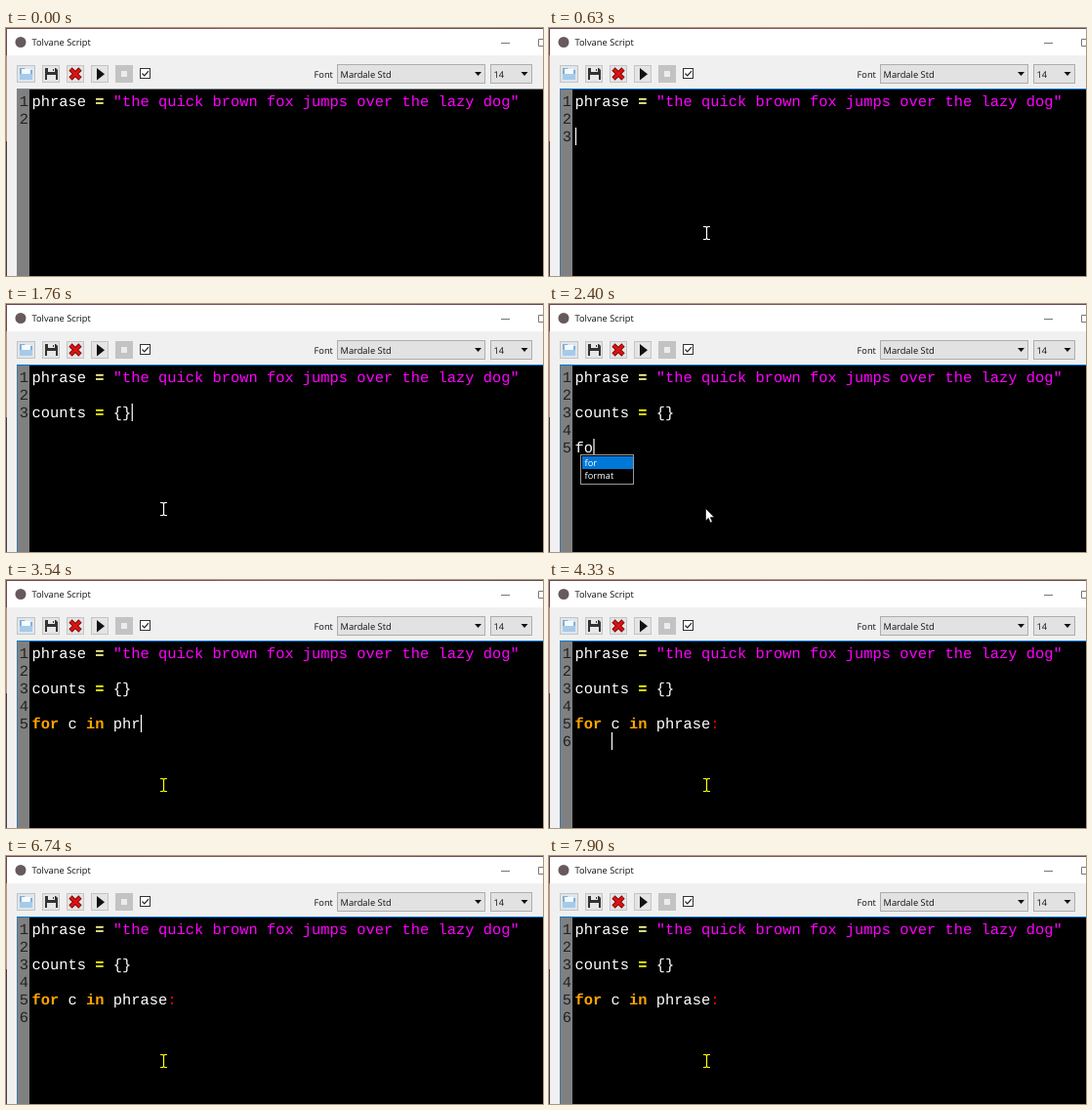
An HTML page that plays this animation: 550x254 px, repeating every 8 s.

```html
<!DOCTYPE html>
<html lang="en">
<head>
<meta charset="utf-8">
<title>Editor typing</title>
<style>
  html, body { margin: 0; width: 550px; height: 254px; overflow: hidden; background: #f0f0f0; }
  svg { display: block; }
  text { white-space: pre; text-rendering: geometricPrecision; }
  .ui { font: 9.3px "Open Sans", "Noto Sans", sans-serif; fill: #111; }
  .code { font: 15.42px "Liberation Mono", monospace; fill: #fff; }
  .num { fill: #222; }
  .key { fill: #ffa500; font-weight: bold; }
  .str { fill: #f0f; }
  .op { fill: #ff0; font-weight: bold; }
  .pale .op { fill: #ffff96; }
  .colon { fill: #f00; }
  .button { fill: #e4e4e4; stroke: #c4c4c4; }
</style>
</head>
<body>
<svg width="550" height="254" viewBox="0 0 550 254">
  <defs>
    <linearGradient id="desk">
      <stop offset="0" stop-color="#6d474c"/>
      <stop offset=".5" stop-color="#8d5a58"/>
      <stop offset="1" stop-color="#6a4850"/>
    </linearGradient>
  </defs>

  <!-- desktop edge and window -->
  <rect width="550" height="254" fill="url(#desk)"/>
  <rect y="28" width="1" height="88" fill="#c58f86"/>
  <rect y="116" width="1" height="138" fill="#4b3545"/>
  <rect x="1" y="1" width="549" height="253" fill="#f0f0f0"/>
  <rect x="1" y="1" width="549" height="27" fill="#fff"/>
  <circle cx="15" cy="14.5" r="5.5" fill="#665a5c"/>
  <text class="ui" x="26.5" y="18">Tolvane Script</text>
  <path d="M507 15.5h9M551 11.5h-5.5v7h6" fill="none" stroke="#777"/>

  <!-- toolbar -->
  <g class="button">
    <rect x="11.5" y="38.5" width="18" height="17"/>
    <rect x="37.5" y="38.5" width="17" height="17"/>
    <rect x="62.5" y="38.5" width="17" height="17"/>
    <rect x="87.5" y="38.5" width="17" height="17"/>
  </g>
  <rect x="13" y="40" width="15" height="14" fill="#d8e8f5"/>
  <path d="M14 41h5l1 2h7v10H14z" fill="#86aed3"/>
  <path d="M16 42h9v5h-9z" fill="#f5faff"/>
  <path d="M14 47h13v6H14z" fill="#a6cbea"/>
  <path d="M40 41h11l2 2v10H40z" fill="#333"/>
  <path d="M43 41h7v4h-7zM42 48h9v5h-9z" fill="#e8e8e8"/>
  <path d="M48 42h1v2h-1z" fill="#333"/>
  <path d="M66 42l10 10M76 42l-10 10" stroke="#7c0808" stroke-width="4.6"/>
  <path d="M66.5 42.5l9 9M75.5 42.5l-9 9" stroke="#df1212" stroke-width="2.8"/>
  <path d="M93 41l8 6.2-8 6.3z" fill="#111"/>
  <rect x="112" y="38" width="18" height="18" fill="#c3c3c3"/>
  <rect x="118" y="44" width="6" height="6" fill="#ececec"/>
  <rect x="137.5" y="41.5" width="10" height="10" fill="#fff" stroke="#333"/>
  <path d="M139.5 46.5l2.2 2.3 4.3-4.7" fill="none" stroke="#222" stroke-width="1.2"/>
  <g fill="#e2e2e2" stroke="#adadad">
    <rect x="339.5" y="37.5" width="151" height="19"/>
    <rect x="496.5" y="37.5" width="42" height="19"/>
  </g>
  <g class="ui">
    <text x="315.5" y="51">Font</text>
    <text x="342.5" y="51">Mardale Std</text>
    <text x="499.5" y="51">14</text>
    <path d="M480 45h7l-3.5 4zM527.5 45h7l-3.5 4z"/>
  </g>

  <!-- editor -->
  <rect id="frame" x="11" y="62" width="539" height="192"/>
  <rect x="24" y="63" width="526" height="191"/>
  <rect x="11.5" y="63" width="12.5" height="191" fill="#808080"/>
  <g id="lines" class="code"></g>
  <rect id="caret" width="1.2" height="18" fill="#fff"/>

  <g id="popup">
    <rect x="32.5" y="154.5" width="54" height="30" stroke="#999"/>
    <rect x="34" y="156" width="52" height="13" fill="#0078d7"/>
    <g class="ui" style="fill:#fff">
      <text x="36.5" y="166">for</text>
      <text x="36.5" y="179">format</text>
    </g>
  </g>

  <path id="beam" d="M158 203.5h2.5l1 1 1-1h2.5M161.5 204v12M158 216.5h2.5l1-1 1 1h2.5" fill="none" stroke-width="1.2"/>
  <path id="arrow" d="M160.5 209.5v12.5l2.8-2.7 2 4.7 2-.9-2-4.5h4z" fill="#fff" stroke="#000" stroke-width=".6"/>
</svg>
<script>
const LOOP = 8000, LEFT = 26.9, TOP = 66, CHAR = 9.25, ROW = 18;
const FIRST = 'phrase = "the quick brown fox jumps over the lazy dog"\n';
const TYPED = '\ncounts = {}\n\nfor c in phrase:\n    ';

// [time, characters typed, caret shown]
const steps = [
  [0, 0, 0], [290, 0, 1], [460, 1, 0], [630, 1, 1], [780, 3, 1], [940, 5, 0],
  [1100, 8, 1], [1270, 9, 0], [1600, 11, 1], [1760, 12, 1], [1920, 13, 1],
  [2080, 14, 1], [2240, 15, 1], [2400, 16, 1], [2570, 19, 1], [2730, 21, 1],
  [2890, 22, 1], [3050, 24, 1], [3210, 25, 1], [3540, 26, 1], [3700, 28, 1],
  [3860, 30, 1], [4020, 35, 0]
];
const blinks = [4330, 4660, 4810, 5140, 5450, 5620, 5930, 6260, 6430, 6740, 7090, 7260, 7570, 7900];
blinks.forEach((t, i) => steps.push([t, TYPED.length, 1 - i % 2]));

const get = id => document.getElementById(id);
const [frame, lines, caret, popup, beam, arrow] =
  ['frame', 'lines', 'caret', 'popup', 'beam', 'arrow'].map(get);
const show = (el, on) => el.setAttribute('visibility', on ? 'visible' : 'hidden');

const tokenClass = s => s[0] === '"' ? 'str' : s === '=' ? 'op' : s === ':' ? 'colon' : 'key';
const highlight = s => s.replace(/".*"|\b(?:for|in)\b|[=:]/g,
  m => `<tspan class="${tokenClass(m)}">${m}</tspan>`);

function drawCode(count) {
  const rows = (FIRST + TYPED.slice(0, count)).split('\n');
  lines.innerHTML = rows.map((row, i) => {
    const y = TOP + ROW * i + 14;
    return `<text class="num" x="13.7" y="${y}">${i + 1}</text>` +
      `<text class="${i ? '' : 'pale'}" x="26.5" y="${y}">${highlight(row)}</text>`;
  }).join('');
  const last = rows.length - 1;
  caret.setAttribute('x', LEFT + CHAR * rows[last].length);
  caret.setAttribute('y', TOP + ROW * last);
}

let shownCount = -1;
function draw() {
  const t = performance.now() % LOOP;
  const [, count, caretOn] = steps.findLast(s => s[0] <= t);
  if (count !== shownCount) drawCode(shownCount = count);
  const focused = t >= 120, completing = t >= 2400 && t < 2570;
  frame.setAttribute('fill', focused ? '#0078d7' : '#828790');
  show(caret, caretOn);
  show(popup, completing);
  show(arrow, completing);
  show(beam, focused && !completing);
  beam.setAttribute('stroke', t < 2570 ? '#fff' : '#ff0');
  requestAnimationFrame(draw);
}
draw();
</script>
</body>
</html>
```
